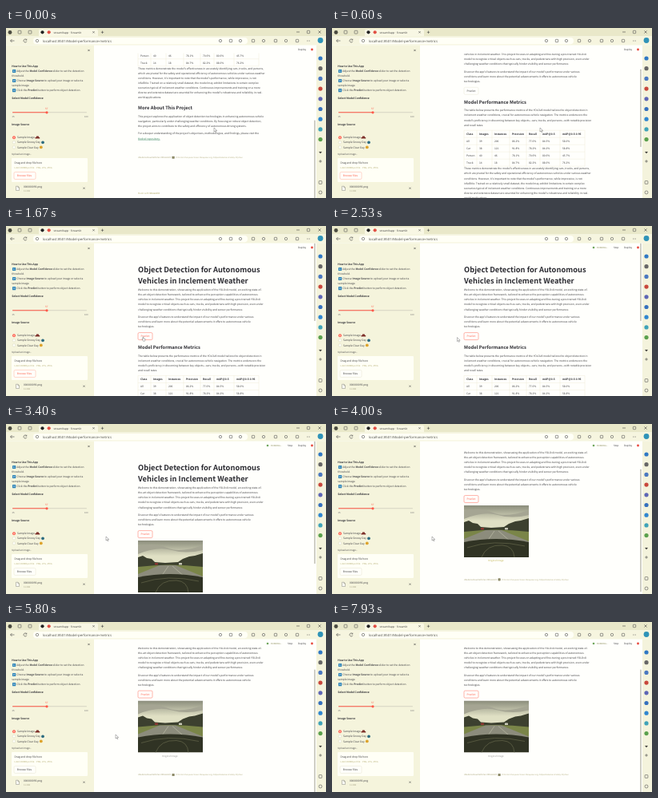
Animation of 400x213 px, one loop 8000 ms. Source, as an HTML page:

```html
<!DOCTYPE html>
<html lang="en">
<head>
<meta charset="utf-8">
<title>Object detection demo</title>
<style>
html, body { margin: 0; height: 100%; overflow: hidden; background: #fffffc; }
svg { display: block; width: 100vw; height: 100vh; }
text { font-family: "Noto Sans CJK JP", "Noto Sans", sans-serif; text-rendering: geometricPrecision; white-space: pre; }
.ui { font-family: "Open Sans", "Noto Sans", sans-serif; }
</style>
</head>
<body>
<svg id="stage" viewBox="0 0 400 213" preserveAspectRatio="none"></svg>
<script>
const LOOP = 8000, CLICK = 1950, RESULT = 2600;
const BODY = 3.28, LINE = 6.08, H1 = 9.3, H2 = 5.8;
const INK = '#404045', RED = '#ff5a4a';

// Markup helpers; text is placed by its vertical middle.
const text = (x, y, s, size = BODY, fill = INK, more = '') =>
  `<text x="${x}" y="${y + size * .36}" font-size="${size}" fill="${fill}" ${more}>${s}</text>`;
const bold = (x, y, s, size = BODY, fill = '#2c2c32') => text(x, y, s, size, fill, 'font-weight="700"');
const lines = (x, y, s) => s.trim().split('\n').map((l, i) => text(x, y + i * LINE, l)).join('');
const rect = (x, y, w, h, fill, r = 0, more = '') =>
  `<rect x="${x}" y="${y}" width="${w}" height="${h}" rx="${r}" fill="${fill}" ${more}/>`;
const dot = (x, y, r, fill, more = '') => `<circle cx="${x}" cy="${y}" r="${r}" fill="${fill}" ${more}/>`;
const path = (d, stroke, fill = 'none', w = .6) =>
  `<path d="${d}" stroke="${stroke}" fill="${fill}" stroke-width="${w}"/>`;
const box = (x, y, size) => rect(x - size / 2, y - size / 2, size, size, 'none', .6, 'stroke="#555" stroke-width=".6"');
const ring = (x, y, r) => dot(x, y, r, 'none', 'stroke="#555" stroke-width=".6"');
const cross = (x, y, r) => path(`M${x - r} ${y - r}l${2 * r} ${2 * r}m0 ${-2 * r}l${-2 * r} ${2 * r}`, '#444');
const plus = (x, y, r) => path(`M${x} ${y - r}v${2 * r}m${-r} ${-r}h${2 * r}`, '#444');
const group = (id, s) => `<g id="${id}">${s}</g>`;

function chrome() {
  const tools = [268, 281, 293, 309, 322, 337, 350, 364];
  const rail = ['#2f78c4', '#666', '#4a78c0', '#c8473c', '#5d66b5', '#3570bd', '#2f86cf', '#3fa3b8', '#5aa04c'];
  return rect(0, 0, 400, 10.5, '#e9e8c9') + rect(0, 10.5, 400, 11, '#f6f5df') +
    rect(41, 1.8, 74, 9, '#f8f7e4', 1.5) +
    dot(5, 5.5, 2.4, '#4b4b40') + box(17, 5.2, 3.8) + box(30, 5.2, 3.8) +
    dot(45.5, 5.3, 2.1, '#222') + dot(53.7, 5.3, 2.1, '#e25045') +
    text(59.5, 5.4, 'streamlitapp · Streamlit', 3.2, '#333', 'class="ui"') +
    cross(109.5, 5.3, 1.1) + plus(120.5, 5.3, 1.7) +
    path('M363 5h4', '#444') + box(378, 5, 3.4) + cross(392, 5, 1.6) +
    path('M10.5 16h-5m2-2l-2 2l2 2', '#444') + path('M25.6 14.7a2 2 0 1 0 .3 2m-.1-3v1.4h-1.4', '#444') +
    rect(34, 12, 268, 8.2, '#fffff6', 4) + ring(39, 16, 1.7) +
    text(46, 16, 'localhost:8501/Model-performance-metrics', 4.25, '#4a4a46', 'class="ui"') +
    tools.map((x, i) => i % 2 ? box(x, 16, 3.4) : ring(x, 16, 1.7)).join('') +
    [376.5, 378, 379.5].map(x => dot(x, 16, .45, '#444')).join('') + dot(393, 15.5, 3.4, '#2f93b8') +
    rect(388, 21.5, 12, 191.5, '#f4f3dc') +
    rail.map((c, i) => dot(393, 38 + i * 12.7, 2.6, c)).join('') +
    path('M391.4 155.2h3.2l-1.6 1.9z', '#222', '#222', .3) + plus(393, 167, 1.8) +
    box(393, 193.5, 3.8) + ring(393, 206, 2);
}

function sidebar() {
  const key = (n, y) => rect(8, y - 2.1, 4.2, 4.2, '#2d83b8', .6) + bold(9.1, y, n, 3, '#fff');
  const b = s => `<tspan font-weight="700">${s}</tspan>`;
  const radio = (y, on) => dot(10, y, 1.8, on ? RED : '#fffff8', `stroke="${on ? RED : '#d0cfb8'}" stroke-width=".4"`) +
    (on ? dot(10, y, .7, '#fff') : '');
  return rect(0, 21.5, 110, 192, '#f5f4dc') + cross(103.5, 28, 1.1) +
    bold(7.3, 47.5, 'How to Use This App') +
    key(1, 54) + text(13.3, 54, `Adjust the ${b('Model Confidence')} slider to set the detection`) + text(7.3, 60, 'threshold.') +
    key(2, 66) + text(13.3, 66, `Choose ${b('Image Source')} to upload your image or select a`) + text(7.3, 72, 'sample image.') +
    key(3, 78.2) + text(13.3, 78.2, `Click the ${b('Predict')} button to perform object detection.`) +
    bold(7.3, 87.5, 'Select Model Confidence') +
    text(49, 101.3, '57', 3, RED) + rect(8, 105.3, 93, 1, '#d5d4c2', .5) + rect(8, 105.3, 43, 1, RED, .5) + dot(51, 105.8, 1.6, RED) +
    text(7.5, 111, '25', 2.8, '#777') + text(98, 111, '100', 2.8, '#777') +
    bold(7.3, 121, 'Image Source') +
    radio(137.2, true) + text(14, 137.2, 'Sample Image') + path('M36.5 138.6v-1.5l1-.2l.7-1.4h2.4l.8 1.4l.8.2v1.5z', 'none', '#7d2f29') +
    radio(143.3) + text(14, 143.3, 'Sample Snowy Day') + dot(46, 143.3, 1.9, '#2d6c80') +
    radio(149.4) + text(14, 149.4, 'Sample Clear Day') + dot(43.8, 149.4, 1.9, '#dda32c') +
    text(7.3, 158, 'Upload an image...', 2.85) +
    rect(7, 163, 95, 30, '#fffff6', 1) +
    text(10.5, 168.8, 'Drag and drop file here') +
    text(10.5, 174.7, 'Limit 200MB per file · PNG, JPG, JPEG', 2.7, '#b4ad75') +
    rect(10, 180.5, 27, 9, '#fffffa', 1.5, 'id="browseBox" stroke-width=".4"') +
    text(13.8, 185, 'Browse files', BODY, INK, 'id="browseText"') +
    path('M12.5 198.3h2.4l1.6 1.6v3.6h-4zm2.4 0v1.6h1.6', '#666', '#fffff5', .4) +
    text(22, 198.7, '000000093.png') + text(22, 204, '51.0KB', 2.5, '#a5a183') + cross(97.5, 200.7, 1);
}

function intro() {
  return bold(165, 55, 'Object Detection for Autonomous', H1) + bold(165, 68.5, 'Vehicles in Inclement Weather', H1) +
    lines(165, 80, `
Welcome to this demonstration, showcasing the application of the YOLOv8 model, an exciting state-of-
the-art object detection framework, tailored to enhance the perception capabilities of autonomous
vehicles in inclement weather. This project focuses on adapting and fine-tuning a pre-trained YOLOv8
model to recognize critical objects such as cars, trucks, and pedestrians with high precision, even under
challenging weather conditions that typically hinder visibility and sensor performance.`) +
    lines(165, 114, `
Discover the app's features to understand the impact of our model's performance under various
conditions and learn more about the potential advancements it offers to autonomous vehicle
technologies.`) +
    rect(165, 133.6, 18, 9, '#fffffc', 1.5, 'id="predictBox" stroke-width=".45"') +
    text(168.5, 138, 'Predict', BODY, INK, 'id="predictText"');
}

function table(top) {
  const cols = [168, 184, 203, 225, 246, 263, 288];
  const rows = `Class Images Instances Precision Recall mAP@0.5 mAP@0.5:0.95
All 39 206 86.2% 77.0% 84.5% 58.0%
Car 38 121 91.8% 78.2% 84.2% 58.8%
Person 40 46 78.1% 70.6% 80.6% 45.7%
Truck 14 18 84.7% 82.2% 88.0% 76.2%`.split('\n').map(r => r.split(' '));
  const edges = [165, 181, 200, 222, 243, 260, 285, 316];
  return rows.map((r, i) => path(`M165 ${top + i * 9}H316`, '#e9e6cf', 'none', .35) +
    r.map((s, j) => (i ? text : bold)(cols[j], top + 4.6 + i * 9, s)).join('')).join('') +
    path(`M165 ${top + 45}H316` + edges.map(x => `M${x} ${top}v45`).join(''), '#e9e6cf', 'none', .35);
}

const tags = y => text(165, y, '#AutonomousVehicles #Streamlit', 2.65, '#a8a278', 'font-style="italic"') +
  rect(207.5, y - 1.6, 3.2, 3.2, '#8d8a68', .7) +
  text(212, y, '#YOLOv8 #ComputerVision #DeepLearning #ObjectDetection #Safety #Python', 2.35, '#b5af85', 'font-style="italic"');

function metrics() {
  return bold(165, 152, 'Model Performance Metrics', H2) +
    lines(165, 162.5, `
The table below presents the performance metrics of the YOLOv8 model tailored to object detection in
inclement weather conditions, crucial for autonomous vehicle navigation. The metrics underscore the
model's proficiency in discerning between key objects—cars, trucks, and persons—with notable precision
and recall rates.`) + table(187.5) +
    lines(165, 235.5, `
These metrics demonstrate the model's effectiveness in accurately identifying cars, trucks, and persons,
which are pivotal for the safety and operational efficiency of autonomous vehicles under various weather
conditions. However, it's important to note that the model's performance, while impressive, is not
infallible. Trained on a relatively small dataset, the model may exhibit limitations in certain complex
scenarios typical of inclement weather conditions. Continuous improvements and training on a more
diverse and extensive dataset are essential for enhancing the model's robustness and reliability in real-
world applications.`) +
    bold(165, 285, 'More About This Project', H2) +
    lines(165, 295.4, `
This project explores the application of object detection technologies in enhancing autonomous vehicle
navigation, particularly under challenging weather conditions. By focusing on robust object detection,
the project aims to contribute to the safety and efficiency of autonomous driving systems.`) +
    text(165, 317, "For a deeper understanding of the project's objectives, methodologies, and findings, please visit the") +
    text(165, 323.1, 'Kodvel repository.', BODY, '#33805c', 'text-decoration="underline"') + tags(347) +
    text(165, 392, 'Made with <tspan font-weight="700">Streamlit</tspan>', 2.8, '#bdb67e');
}

// Road seen through a windscreen, as flat shapes.
function photo() {
  return '<svg x="165" y="146" width="81" height="65" viewBox="0 0 81 65">' +
    rect(0, 0, 81, 65, 'url(#sky)') +
    path('M0 7Q20 2 36 9T81 6v6Q60 17 42 12T0 17z', 'none', '#a5a593') +
    path('M0 21l6-2l5 3l6 1l4 4l13 1l16-1l6-4l8-3l7-1l10-3v20H0z', 'none', '#3c402f') +
    path('M0 33Q40 28 81 33v19H0z', 'none', '#7a8548') +
    path('M27 31h20l34 14v13H0V42z', 'none', '#8c8c7c') +
    path('M38 32l-9 13M43 32l16 14', '#c4c4ae', 'none', .6) +
    rect(21, 28, 4, 2.5, '#8d3832', .8) + rect(51, 28, 4, 2.5, '#c9c9b9', .6) +
    path('M0 65V46Q40 38 81 46v19z', 'none', '#303324') +
    path('M4 53Q37 42 76 51M22 65Q28 49 48 50Q62 51 63 65', '#55573f', 'none', 1) + '</svg>';
}

const status = '<g id="running">' + dot(327, 27, 1.3, '#71a75e') +
  text(331, 27, 'RUNNING...', 2.7, '#8f9060') + text(352, 27, 'Stop', 3) + '</g>';

document.getElementById('stage').innerHTML = `
<defs>
  <linearGradient id="sky" x2="0" y2="1"><stop stop-color="#8a8c7b"/><stop offset=".3" stop-color="#e0e0c4"/></linearGradient>
  <clipPath id="view"><rect x="107" y="31.5" width="281" height="182"/></clipPath>
</defs>` + rect(0, 0, 400, 213, '#fffffc') +
  `<g clip-path="url(#view)">` + group('page', intro() + group('metrics', metrics()) +
    group('result', photo() + text(195, 215.3, 'Original Image', 2.9, '#999', 'id="caption"') + tags(239))) + '</g>' +
  rect(385.4, 0, 1.1, 0, '#aaa99a', .5, 'id="thumb"') +
  sidebar() + chrome() + status + text(365, 27, 'Deploy', 3.1) + dot(382.5, 27, 1.4, '#e8473c') +
  group('arrow', path('M0 0v5l1.2-1.1l.9 1.9l.8-.4l-.9-1.8h1.7z', '#555', '#fff', .4)) +
  group('hand', path('M0 0v3l-1-.5l1.4 2.7h2.2l.5-2.7l-2.2-.6V0z', '#555', '#fff', .4));

const el = id => document.getElementById(id);
const set = (id, attrs) => { for (const k in attrs) el(id).setAttribute(k, attrs[k]); };
const show = (id, on) => set(id, { display: on ? 'inline' : 'none' });
const part = (t, a, b) => Math.min(1, Math.max(0, (t - a) / (b - a)));
const ease = p => p * p * (3 - 2 * p);

function scrollAt(t) {
  if (t < CLICK) return 185 * (1 - part(t, 0, 1130)) ** 1.5;
  return 47.5 * (1 - (1 - part(t, 3500, 4185)) ** 2);
}

function draw(t) {
  const clicked = t >= CLICK, done = t >= RESULT;
  const scroll = scrollAt(t), view = 191.5, shrink = view / (view + (done ? 47.5 : 185));
  set('page', { transform: `translate(0 ${-scroll})` });
  set('thumb', { y: 21.5 + scroll * shrink, height: view * shrink });
  show('metrics', !done);
  show('result', done);
  show('running', clicked);

  const toButton = ease(part(t, 1400, 1640)), away = ease(part(t, 2250, 3000)), drift = ease(part(t, 4870, 5500));
  const x = 260 - 89 * toButton - 46 * away + 12 * drift;
  const y = 125 + 14 * toButton + 2 * away;
  const over = t > 1590 && t < 2350;
  for (const id of ['arrow', 'hand']) set(id, { transform: `translate(${x} ${y})` });
  show('arrow', !over && t < 6930);
  show('hand', over);

  const hot = t > 1590;
  set('predictBox', { stroke: hot ? RED : '#e6e4d2' });
  set('predictText', { fill: hot ? RED : INK });
  set('browseBox', { stroke: clicked ? '#dedbc8' : '#ff9b88' });
  set('browseText', { fill: clicked ? INK : RED });
  set('caption', { fill: t < 5000 ? '#c3b758' : '#999' });
}

function tick() {
  draw(performance.now() % LOOP);
  requestAnimationFrame(tick);
}
tick();
</script>
</body>
</html>
```
